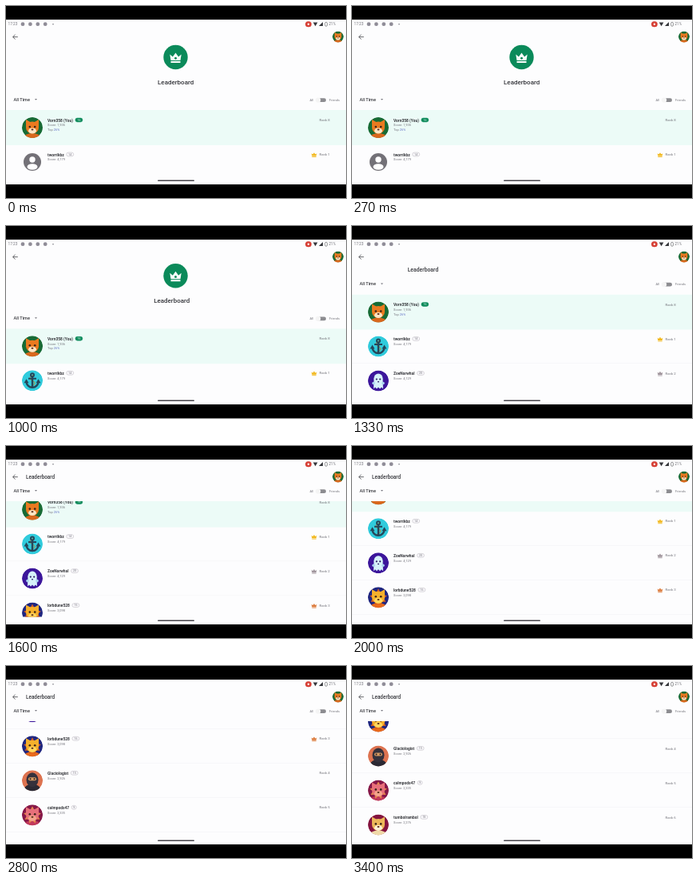
An HTML page with a canvas for the animation above (3.47 s loop, 426 px wide and 240 px high).

```html
<!DOCTYPE html>
<html lang="en">
<head>
<meta charset="utf-8">
<title>Leaderboard</title>
<style>
html, body { margin: 0; width: 100%; height: 100%; overflow: hidden; background: #000; }
canvas { display: block; }
</style>
</head>
<body>
<canvas id="stage" width="426" height="240"></canvas>
<script>
const c = document.getElementById('stage').getContext('2d');
const LOOP = 3470, STEPS = 52, PITCH = 43;
const PAPER = '#fdfdfe', INK = '#35363b', GREY = '#74747c', GREEN = '#0b8a5a';
const MEDALS = ['', '#f2b81c', '#a0959c', '#dc7b3c'];

const tiger = () => beast('#176b35', '#ea7a20', '#fbe6c6', '#d9681d');
const flame = () => beast('#1f2680', '#f5b02c', '#ffd860', '#ea6a1c', '#d9601f');
const dragon = () => beast('#861848', '#e8707a', '#f4a58c', '#c23a5c', '#e58a4a');
const dog = () => beast('#84143f', '#ecb75a', '#fff2d7', '#f0d9a8');

// The first player is the viewer; the others are listed by rank.
const PLAYERS = [
  { name: 'Vorn358 (You)', level: 16, score: '1,936', art: tiger },
  { name: 'tworrikbz', level: 14, score: '4,179', art: anchor },
  { name: 'ZoeNarwhal', level: 20, score: '4,129', art: ghost },
  { name: 'lorbdune528', level: 16, score: '3,098', art: flame },
  { name: 'Glaciologist', level: 15, score: '2,926', art: ninja },
  { name: 'calmpods47', level: 9, score: '2,335', art: dragon },
  { name: 'tumbolrambol', level: 18, score: '2,276', art: dog }
];

// A swipe picks up speed, then glides to rest.
function fling(t, start, distance) {
  const u = Math.max(0, t - start) / 255;
  return distance * (1 - (1 + u) * Math.exp(-u));
}
const scrollAt = t => fling(t, 950, 100) + fling(t, 2190, 117.5);

function rect(x, y, w, h, color) {
  c.fillStyle = color;
  c.fillRect(x, y, w, h);
}
function pill(x, y, w, h, color, stroke) {
  c.beginPath();
  c.roundRect(x, y, w, h, h / 2);
  c.fillStyle = color;
  c.fill();
  if (!stroke) return;
  c.strokeStyle = stroke;
  c.lineWidth = .5;
  c.stroke();
}
function dot(x, y, r, color, ry = r) {
  c.fillStyle = color;
  c.beginPath();
  c.ellipse(x, y, r, ry, 0, 0, 7);
  c.fill();
}
function pair(x, y, r, color) {
  dot(-x, y, r, color);
  dot(x, y, r, color);
}
function poly(color, ...points) {
  c.fillStyle = color;
  c.beginPath();
  points.forEach(p => c.lineTo(...p));
  c.fill();
}
function stroke(color, width, path) {
  c.strokeStyle = color;
  c.lineWidth = width;
  c.beginPath();
  path();
  c.stroke();
}
function text(str, x, y, size, color = INK, weight = 400) {
  c.font = `${weight} ${size}px Roboto, sans-serif`;
  c.fillStyle = color;
  c.fillText(str, x, y + .6);
  return c.measureText(str).width;
}
function at(x, y, scale, draw) {
  c.save();
  c.translate(x, y);
  c.scale(scale, scale);
  draw();
  c.restore();
}
function crown(x, y, scale, color, gem = color) {
  at(x, y, scale, () => {
    const tips = [-2, -1, 0, 1, 2].map(i => [i * 3.6, i % 2 ? -1 : -4 - 2 * !i]);
    poly(color, [-6, 3.5], ...tips, [6, 3.5]);
    rect(-6, 4.5, 12, 2, color);
    dot(0, .8, 1.5, gem);
  });
}

// Avatars are drawn in a circle of radius 13 around the origin.
function avatar(art, x, y, r = 13) {
  at(x, y, r / 13, () => {
    c.beginPath();
    c.arc(0, 0, 13, 0, 7);
    c.clip();
    art();
  });
}
function spikes(count, outer, inner, color) {
  poly(color, ...Array.from({ length: 2 * count }, (_, i) => {
    const a = i * Math.PI / count, r = i % 2 ? inner : outer;
    return [r * Math.sin(a), -r * Math.cos(a)];
  }));
}
function beast(back, fur, muzzle, body, mane) {
  dot(0, 0, 13, back);
  dot(0, 13, 11, body, 6);
  if (mane) spikes(9, 11, 7, mane);
  for (const s of [-1, 1]) poly(fur, [s, -6], [8 * s, -10], [8 * s, 0]);
  dot(0, 0, 8, fur, 7.5);
  dot(0, 4, 5, muzzle, 3.5);
  pair(3.2, -1, 1.3, '#3b2419');
  dot(0, 2.6, 1.5, '#5a2816', 1);
}
function anchor() {
  const ink = '#25465a';
  dot(0, 0, 13, '#30cbdc');
  stroke('#9a9a58', 1.2, () => {
    for (let y = -7; y < 9; y++) c.lineTo(3 * Math.sin(y / 2), y);
  });
  stroke(ink, 2, () => c.arc(0, -7, 2, 0, 7));
  stroke(ink, 2.4, () => c.arc(0, 1, 7.5, 0, Math.PI));
  rect(-1.2, -5, 2.4, 14, ink);
  rect(-5, -3.5, 10, 2, ink);
  for (const s of [-1, 1]) poly(ink, [10.5 * s, 3], [7.5 * s, -2], [4.5 * s, 3]);
}
function ghost() {
  dot(0, 0, 13, '#3c169b');
  const hem = Array.from({ length: 7 }, (_, i) => [6 - 2 * i, i % 2 ? 8 : 10]);
  dot(0, -3, 5.5, '#d6f2fa', 6);
  poly('#d6f2fa', [-5.5, -3], [5.5, -3], ...hem);
  pair(6, 3, 1.8, '#a9d3ee');
  pair(2.2, -2, 1.1, '#2a1760');
  dot(0, 1.2, 1.1, '#2a1760', .7);
}
function ninja() {
  dot(0, 0, 13, '#dd7350');
  dot(0, 13, 11, '#2b2933', 9);
  dot(0, -1, 7.5, '#35313c', 9);
  pill(-5, -4, 10, 4, '#d69a62');
  pair(2.5, -2, 1, '#201a20');
}
function placeholder() {
  dot(0, 0, 11, '#737177');
  dot(0, -3, 3.7, '#fff');
  dot(0, 6, 6.5, '#fff', 3.8);
}

function drawRow(player, i, scroll, t) {
  const y = 142.5 + PITCH * i - scroll, rank = i || 8, you = !i;
  if (you) rect(0, y - 12.5, 426, PITCH + 1, '#ecfbf7');
  else rect(0, y + 30.5, 426, .5, '#f1f1f3');
  avatar(i === 1 && t < 800 ? placeholder : player.art, 33, y + 9.5);

  const x = 55 + text(player.name, 52, y, 4.9, INK, 600);
  const w = player.level > 9 ? 9 : 6;
  pill(x, y - 2.4, w, 4.8, you ? GREEN : '#f8f7fa', you ? GREEN : '#b6b2bb');
  c.textAlign = 'center';
  text(player.level, x + w / 2, y - .3, 3.4, you ? '#fff' : GREY);
  c.textAlign = 'left';

  text('Score: ' + player.score, 52, y + 6, 4, GREY);
  if (you) text('26%', 52 + text('Top ', 52, y + 11.8, 4, GREY), y + 11.8, 4, '#6674c8');
  text('Rank ' + rank, 392.5, y - .2, 4.4, GREY);
  if (MEDALS[rank]) crown(386, y + .5, .45, MEDALS[rank]);
}

function drawFilter(y) {
  text('All Time', 9.5, y - .3, 5.5, INK, 500);
  poly(GREY, [36, y - 1], [39, y - 1], [37.5, y + .8]);
  text('All', 380.5, y, 4, GREY);
  pill(389, y - 1.7, 12, 4.8, '#8c8c90');
  dot(391, y + .6, 3.2, '#f5f5f5');
  text('Friends', 405, y, 4, GREY);
}

function drawStatusBar() {
  text('17:23', 2.5, 22.4, 4.8, GREY);
  for (let i = 0; i < 4; i++) dot(21 + 9.4 * i, 22.7, 2.4, '#8f8c97');
  dot(59, 22.7, .8, GREY);
  pill(375, 19.2, 7.8, 7, '#d63f35');
  dot(378.9, 22.7, 1.2, '#fff');
  poly(INK, [384.8, 20.6], [390.4, 20.6], [387.6, 25.2]);
  poly(INK, [392, 25], [397, 25], [397, 20]);
  pill(399.7, 20.3, 2.8, 5, PAPER, INK);
  text('21%', 404.5, 22.4, 4.6, GREY);
}

function draw(t) {
  const scroll = scrollAt(t), folded = Math.min(1, scroll / 61);
  const filterY = 117 - 61 * folded, listTop = filterY + 13;
  c.textBaseline = 'middle';
  rect(0, 0, 426, 240, '#000');
  rect(0, 17, 426, 206, PAPER);

  c.save();
  c.beginPath();
  c.rect(0, listTop, 426, 213.5 - listTop);
  c.clip();
  PLAYERS.forEach((player, i) => drawRow(player, i, scroll, t));
  c.restore();

  c.globalAlpha = Math.max(0, Math.min(1, 1.6 - folded * 2.6));
  dot(212.5, 64 - scroll, 15.2, GREEN);
  crown(212.5, 64.5 - scroll, 1, '#fff', GREEN);
  c.globalAlpha = 1;

  drawFilter(filterY);
  drawStatusBar();
  stroke('#55565b', .9, () => {
    c.moveTo(14.8, 38.7);
    c.lineTo(8.6, 38.7);
    c.moveTo(11.5, 35.8);
    c.lineTo(8.6, 38.7);
    c.lineTo(11.5, 41.6);
  });
  text('Leaderboard', 190 - 165 * folded, 95 - 56.2 * folded, 8 - 1.6 * folded, INK, 500);
  avatar(tiger, 416, 38.5, 7);
  pill(190, 217.4, 46, 1.5, '#45434a');
}

function tick() {
  const step = LOOP / STEPS;
  draw(Math.floor((performance.now() + 4) / step) % STEPS * step);
  requestAnimationFrame(tick);
}
tick();
</script>
</body>
</html>
```
